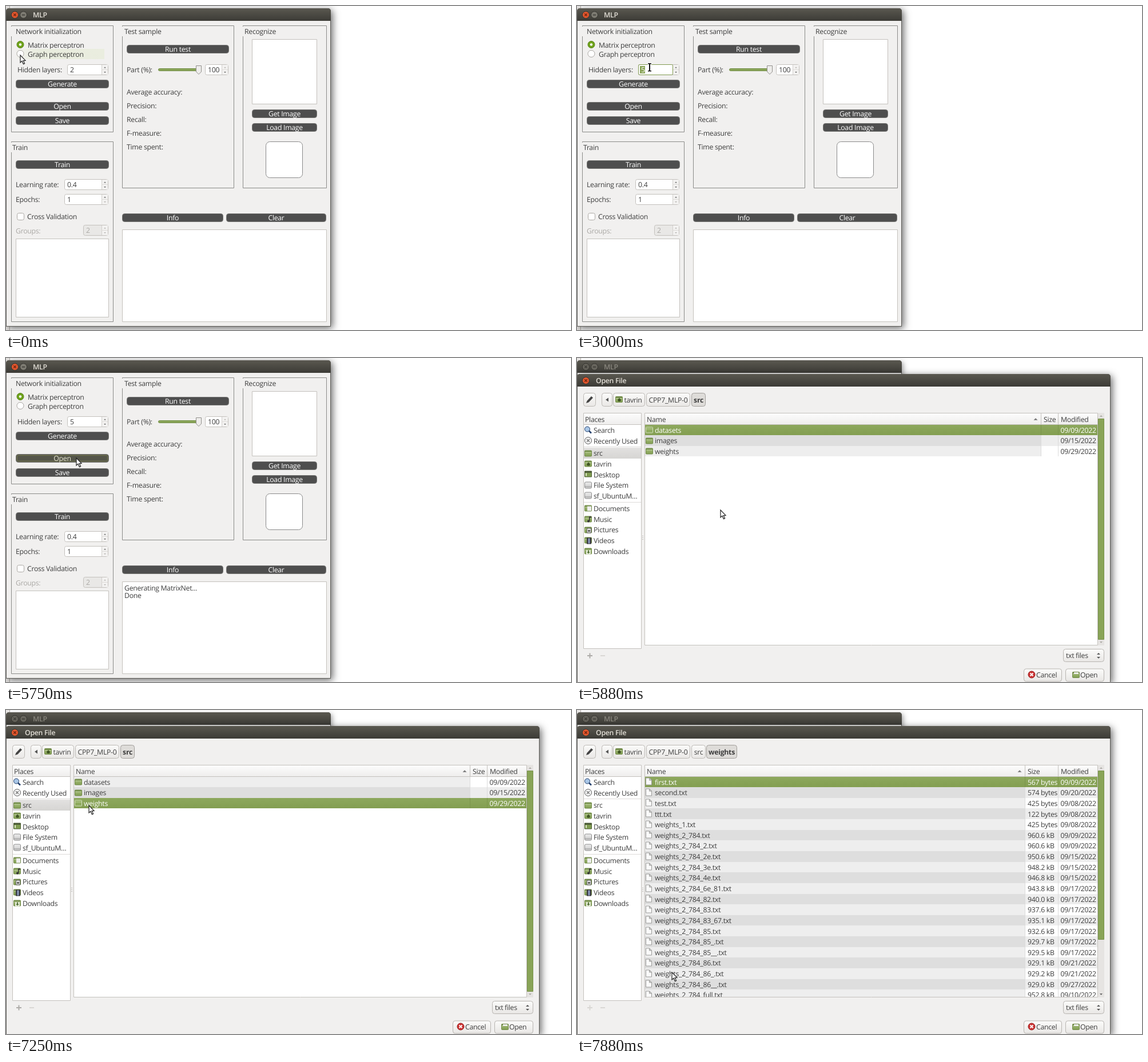
Write an HTML page with a canvas that moves like this. It is 988 px wide and 567 px high and loops after 8 s.

```html
<!DOCTYPE html>
<html lang="en">
<head>
<meta charset="utf-8">
<title>Perceptron window</title>
<style>
html, body { margin: 0; width: 100%; height: 100%; overflow: hidden; background: #fff; }
canvas { display: block; }
</style>
</head>
<body>
<canvas id="stage" width="988" height="567"></canvas>
<script>
const ctx = document.getElementById('stage').getContext('2d');
const LOOP = 8000, STEP = 125;
const FACE = '#f1f0ef', INK = '#3e3e3e', GREEN = '#89a458', LINE = '#8b8b89', PALE = '#c4c1bd';

// time, x, y of the pointer
const pointerPath = [
  [0, 25, 86], [125, 25, 84], [500, 29, 67], [1000, 32, 68], [1500, 162, 111],
  [1750, 171, 107], [2500, 171, 107], [2750, 160, 107], [3000, 127, 107],
  [3250, 119, 134], [4250, 119, 134], [4875, 123, 175], [5750, 123, 175],
  [5875, 251, 266], [6125, 246, 258], [6750, 145, 167], [7500, 145, 167],
  [7625, 148, 205], [7875, 166, 459]
];
const OPEN_AT = 5875, ENTER_AT = 7500;

function pointerAt(t) {
  const i = pointerPath.findIndex(p => p[0] > t);
  if (i < 0) return pointerPath.at(-1).slice(1);
  const [t0, x0, y0] = pointerPath[i - 1], [t1, x1, y1] = pointerPath[i];
  const k = (t - t0) / (t1 - t0);
  return [x0 + (x1 - x0) * k, y0 + (y1 - y0) * k];
}

function text(s, x, yc, color = INK, align = 'left', weight = 500) {
  ctx.font = weight + ' 12.3px "Open Sans", sans-serif';
  ctx.letterSpacing = '-0.3px';
  ctx.textRendering = 'geometricPrecision';
  ctx.textAlign = align;
  ctx.fillStyle = color;
  ctx.fillText(s, x, yc + 4.5);
}

function rect(x0, y0, x1, y1, fill) {
  ctx.fillStyle = fill;
  ctx.fillRect(x0, y0, x1 - x0, y1 - y0);
}

function box(x0, y0, x1, y1, fill, stroke, radius = 0) {
  ctx.beginPath();
  ctx.roundRect(x0 + .5, y0 + .5, x1 - x0 - 1, y1 - y0 - 1, radius);
  paint(fill, stroke);
}

function paint(fill, stroke, width = 1) {
  if (fill) { ctx.fillStyle = fill; ctx.fill(); }
  if (stroke) { ctx.strokeStyle = stroke; ctx.lineWidth = width; ctx.stroke(); }
}

function poly(points, fill, stroke, width) {
  ctx.beginPath();
  points.forEach(([x, y]) => ctx.lineTo(x, y));
  ctx.closePath();
  paint(fill, stroke, width);
}

function disc(x, y, r, fill, stroke) {
  ctx.beginPath();
  ctx.arc(x, y, r, 0, 7);
  paint(fill, stroke);
}

function cross(x, y, r, color, width = 1.3) {
  ctx.beginPath();
  ctx.moveTo(x - r, y - r); ctx.lineTo(x + r, y + r);
  ctx.moveTo(x + r, y - r); ctx.lineTo(x - r, y + r);
  paint(null, color, width);
}

function shade(y0, y1, top, bottom) {
  const g = ctx.createLinearGradient(0, y0, 0, y1);
  g.addColorStop(0, top);
  g.addColorStop(1, bottom);
  return g;
}

// small triangle; dir -1 points up, 1 points down
function tri(x, y, dir, r, color) {
  poly([[x - r, y - dir * r / 2], [x + r, y - dir * r / 2], [x, y + dir * r / 2]], color);
}

function windowFrame(y, right, bottom, title, titleX, active, minimize) {
  ctx.save();
  ctx.shadowColor = active ? 'rgba(0,0,0,.6)' : 'rgba(0,0,0,.35)';
  ctx.shadowBlur = active ? 13 : 8;
  ctx.shadowOffsetX = ctx.shadowOffsetY = 3;
  ctx.beginPath();
  ctx.roundRect(0, y, right, bottom - y, [5, 5, 0, 0]);
  paint('#5d5c57');
  ctx.restore();
  ctx.beginPath();
  ctx.roundRect(0, y, right, 22, [5, 5, 0, 0]);
  paint(shade(y, y + 22, '#5a5850', '#3c3b36'));
  rect(1, y + 22, right - 1, bottom - 1, FACE);
  const cy = y + 11.5;
  disc(15.5, cy, 6, active ? '#e4572e' : '#66645c', '#34332e');
  cross(15.5, cy, 2.3, active ? '#6b2410' : '#3a3934');
  if (minimize) {
    disc(30.5, cy, 6, active ? '#7b7970' : '#66645c', '#34332e');
    rect(28, cy - .5, 33, cy + .8, '#32312d');
  }
  text(title, titleX, cy - .3, active ? '#e2ded6' : '#8a877e', 'left', 600);
}

function group(x0, y0, x1, y1, title, tx) {
  box(x0, y0, x1, y1, null, LINE);
  rect(x0, y0 + 2, x0 + 2, y0 + 19, FACE);
  text(title, tx, y0 + 10);
}

function button(x0, x1, yc, label, focused) {
  const y = Math.round(yc - 7.5);
  box(x0, y, x1, y + 15, focused ? '#55564a' : '#4e4e4e', '#777775', 4);
  if (focused) box(x0 + 2, y + 2, x1 - 2, y + 13, null, '#74774f', 2);
  text(label, (x0 + x1) / 2, yc + .3, focused ? '#e9e8d4' : '#fff', 'center');
}

function spin(x0, x1, y0, value, { disabled, focused, atMax, atMin } = {}) {
  const y1 = y0 + 19, split = x1 - 12;
  box(x0, y0, x1, y1, disabled ? '#e9e8e6' : '#fff', PALE, 3);
  rect(split, y0 + 1, x1 - 1, y1 - 1, '#f3f2f1');
  rect(split, y0 + 1, split + 1, y1 - 1, '#d3d0cd');
  rect(split, y0 + 9, x1 - 1, y0 + 10, '#dddbd8');
  tri(x1 - 6, y0 + 5.5, -1, 2, disabled || atMax ? '#b5b3b0' : '#666');
  tri(x1 - 6, y0 + 14, 1, 2, disabled || atMin ? '#b5b3b0' : '#666');
  if (focused) {
    box(x0, y0, split + 1, y1, null, '#80994f', 2);
    rect(x0 + 3, y0 + 3, x0 + 12, y0 + 16, GREEN);
  }
  text(value, x0 + 5, y0 + 9.5, disabled ? '#aaa8a5' : focused ? '#fff' : INK);
}

function radio(yc, label, checked, hovered, focused) {
  if (hovered) {
    const g = ctx.createLinearGradient(18, 0, 172, 0);
    g.addColorStop(0, '#f0f0ec');
    g.addColorStop(.3, '#e8ecdd');
    g.addColorStop(1, '#eaeddf');
    rect(18, yc - 9, 172, yc + 9, g);
  }
  if (focused) box(36, yc - 7, 140, yc + 8, '#dfe7cf', '#9db374', 2);
  disc(25, yc - .5, 6, checked ? '#6fa31a' : '#fff', checked ? '#55801a' : '#a9a6a2');
  if (checked) disc(25, yc - .5, 2.2, '#fff');
  text(label, 38, yc);
}

function mainWindow(t, [px, py]) {
  windowFrame(4, 568, 561, 'MLP', 47, true, true);
  group(9, 34, 188, 221, 'Network initialization', 17);
  group(9, 237, 188, 553, 'Train', 11);
  group(203, 34, 399, 319, 'Test sample', 207);
  group(414, 34, 561, 319, 'Recognize', 417);

  const overRadio = y => px >= 18 && px < 173 && Math.abs(py - y) < 9;
  const clickedRadio = t >= 625 && t < 1875;
  radio(68, 'Matrix perceptron', true, overRadio(68), clickedRadio);
  radio(84, 'Graph perceptron', false, overRadio(84));
  const layers = 2 + (t >= 1875) + (t >= 2125) + (t >= 2375);
  text('Hidden layers:', 20, 111.5);
  spin(107, 179, 102, layers, { focused: t >= 1875 && t < 3500 });
  button(17, 180, 136, 'Generate', t >= 3500 && t < 5375);
  button(17, 180, 175.5, 'Open', t >= 5375);
  button(17, 180, 200, 'Save');

  button(17, 180, 277.5, 'Train');
  text('Learning rate:', 17, 312.5);
  spin(102, 179, 303, '0.4');
  text('Epochs:', 17, 338.5);
  spin(102, 179, 329, '1', { atMin: true });
  box(19, 362, 32, 375, '#fff', '#aaa7a3', 3);
  text('Cross Validation', 37, 368.5);
  text('Groups:', 17, 393, '#aaa8a5');
  spin(135, 179, 383, '2', { disabled: true });
  box(17, 407, 180, 545, '#fff', PALE);

  button(211, 390, 75, 'Run test');
  text('Part (%):', 211, 111.5);
  box(266, 109, 337, 114, GREEN, '#75904a', 2);
  poly([[332.5, 104.5], [341.5, 104.5], [341.5, 115], [337, 119.5], [332.5, 115]], '#eeedeb', '#918f8c');
  spin(348, 389, 102, '100', { atMax: true });
  ['Average accuracy:', 'Precision:', 'Recall:', 'F-measure:', 'Time spent:']
    .forEach((s, i) => text(s, 211, 150 + 24 * i));

  box(430, 58, 544, 172, '#fff', PALE);
  button(430, 544, 188, 'Get Image');
  button(430, 544, 212, 'Load Image');
  box(454, 237, 519, 301, '#fff', '#8a8a8a', 7);

  button(203, 380, 370.5, 'Info');
  button(385, 560, 370.5, 'Clear');
  box(203, 391, 561, 553, '#fff', PALE);
  if (t >= 3625) text('Generating MatrixNet...', 207, 402);
  if (t >= 3750) text('Done', 207, 415.5);
}

function folder(x, yc, mark) {
  box(x, yc - 5, x + 13, yc + 6, shade(yc - 3, yc + 6, '#a3bb78', '#7f9c50'), '#718a49', 1);
  rect(x + 1, yc - 4, x + 12, yc - 2, '#6f8a45');
  rect(x + 1, yc - 2, x + 12, yc - 1, '#c3d3a3');
  if (mark) mark(x + 7, yc + 1);
}

// folder in a selected row, only its pale outline shows
function openFolder(x, yc) {
  box(x, yc - 5, x + 13, yc + 6, '#8fab5f', '#d3dfbd', 1);
  rect(x + 1, yc - 2, x + 12, yc - 1, '#c3d3a3');
}

function page(x, yc) {
  poly([[x + .5, yc - 6.5], [x + 6.5, yc - 6.5], [x + 10.5, yc - 2.5], [x + 10.5, yc + 5.5], [x + .5, yc + 5.5]], '#fafafa', '#9a9a98');
  poly([[x + 6.5, yc - 6.5], [x + 6.5, yc - 2.5], [x + 10.5, yc - 2.5]], '#ddd', '#9a9a98');
}

function drive(x, yc) {
  box(x, yc - 6, x + 13, yc + 6, shade(yc - 6, yc + 6, '#eee', '#c8c8c8'), '#8c8c8c', 2);
  rect(x + 1, yc + 2, x + 12, yc + 3, '#999');
}

const house = (x, y) => poly([[x - 3, y], [x, y - 3], [x + 3, y], [x + 2, y + 3], [x - 2, y + 3]], '#3f5423');
const sheet = (x, y) => rect(x - 2, y - 4, x + 5, y + 4, '#eee');
const note = (x, y) => { disc(x, y + 3, 2, '#333'); rect(x + 1, y - 5, x + 2.5, y + 3, '#333'); rect(x + 2, y - 5, x + 5, y - 3, '#333'); };
const photo = (x, y) => { box(x - 3, y - 4, x + 5, y + 5, '#eee', '#555'); disc(x + 1, y + 1, 2, '#555'); };
const film = (x, y) => { rect(x - 3, y - 5, x + 5, y + 6, '#333'); rect(x - 1, y - 4, x + 3, y + 5, '#7d88a8'); };
const down = (x, y) => { rect(x - 4, y - 2, x + 4, y + 5, '#e8eedc'); rect(x - 1, y - 2, x + 1, y + 2, '#55713a'); tri(x, y + 2.5, 1, 3, '#55713a'); };

const places = [
  ['Search', 126, (x, y) => {
    disc(x + 5, y - 1, 4.5, '#a9c6e6', '#24406c');
    poly([[x + 8, y + 2], [x + 12, y + 6]], null, '#24406c', 2.5);
  }],
  ['Recently Used', 145, (x, y) => { disc(x + 6.5, y, 6, '#f4f4f4', '#555'); cross(x + 6.5, y, 2.5, '#777'); }],
  ['src', 166.5, folder],
  ['tavrin', 185, (x, y) => folder(x, y, house)],
  ['Desktop', 204, (x, y) => { box(x, y - 6, x + 13, y + 5, '#7f9c50', '#4b5c34'); rect(x + 1, y - 5, x + 12, y - 3, '#3f4a30'); rect(x + 2, y - 2, x + 4, y + 3, '#dce6c8'); }],
  ['File System', 222.5, drive],
  ['sf_UbuntuM…', 241, drive],
  ['Documents', 263, (x, y) => folder(x, y, sheet)],
  ['Music', 282, (x, y) => folder(x, y, note)],
  ['Pictures', 300.5, (x, y) => folder(x, y, photo)],
  ['Videos', 319, (x, y) => folder(x, y, film)],
  ['Downloads', 338, (x, y) => folder(x, y, down)]
];

const folders = [['datasets', '', '09/09'], ['images', '', '09/15'], ['weights', '', '09/29']];
const files = `first 567 09 09|second 574 09 20|test 425 09 08|ttt 122 09 08|weights_1 425 09 08
_ 960.6 09 09|_2 960.6 09 09|_2e 950.6 09 15|_3e 948.2 09 15|_4e 946.8 09 15|_6e_81 943.8 09 17
_82 940.0 09 17|_83 937.6 09 17|_83_67 935.1 09 17|_85 932.6 09 17|_85_ 929.7 09 17|_85__ 929.5 09 17
_86 929.1 09 21|_86_ 929.2 09 21|_86__ 929.0 09 27|_full 952.8 09 10`.split(/[|\n]/).map(line => {
  const [name, size, month, day] = line.split(' ');
  const base = name[0] === '_' ? 'weights_2_784' + (name === '_' ? '' : name) : name;
  return [base + '.txt', size + (size.includes('.') ? ' kB' : ' bytes'), month + '/' + day];
});

function pathButton(x0, x1, label, pressed, labelX = (x0 + x1) / 2) {
  box(x0, 61, x1, 85, pressed ? '#dedcd9' : shade(61, 85, '#fbfbfa', '#e9e7e5'), pressed ? '#a19e9a' : '#bcb9b5', 4);
  text(label, labelX, 73, INK, 'center', pressed ? 700 : 500);
}

function actionButton(x0, x1, y0, label, labelX) {
  box(x0, y0, x1, y0 + 23, shade(y0, y0 + 23, '#fcfcfb', '#e8e6e4'), '#b8b5b1', 4);
  text(label, labelX, y0 + 11);
}

function fileList(rows, selected, sizeX, thumbEnd, icon, selectedIcon = icon) {
  const top = 116.6, rowH = 18.63;
  box(118, 96, 911, 503, '#fff', PALE);
  ctx.save();
  ctx.beginPath();
  ctx.rect(119, 97, 791, 405);
  ctx.clip();
  rows.forEach(([name, size, date], i) => {
    const y = Math.round(top + i * rowH), end = Math.round(top + (i + 1) * rowH), yc = 126.2 + i * rowH;
    const chosen = i === selected, ink = chosen ? '#fff' : INK;
    rect(119, y, 910, end, i % 2 ? '#ededed' : '#fff');
    rect(119, y, sizeX, end, i % 2 ? '#dedede' : '#eeeeee');
    if (chosen) rect(119, y, 910, end, shade(y, end, '#8da85d', '#839e51'));
    rect(sizeX - 1, y, sizeX, end, chosen ? '#7b954c' : '#dcdcdc');
    rect(841, y, 842, end, chosen ? '#7b954c' : '#dcdcdc');
    (chosen ? selectedIcon : icon)(120, Math.round(yc) - .5);
    text(name, 136, yc, ink);
    text(size, 788, yc, ink);
    text(date + '/2022', 845.5, yc, ink);
  });
  rect(119, 97, 910, 116, shade(97, 116, '#fcfcfc', '#efeeed'));
  rect(119, 116, 910, 117, PALE);
  rect(sizeX - 1, 97, sizeX, 116, PALE);
  rect(841, 97, 842, 116, PALE);
  ctx.restore();
  text('Name', 122, 107);
  text('Size', sizeX + 4, 107);
  text('Modified', 846, 107);
  tri(sizeX - 10, 107, -1, 3.5, '#777');

  rect(911, 96, 922, 503, '#e6e4e2');
  box(911, 106, 922, thumbEnd, GREEN, '#78934a');
  tri(916.5, 101.5, -1, 2.5, '#a5a29e');
  tri(916.5, 497.5, 1, 2.5, thumbEnd < 450 ? '#555' : '#a5a29e');
}

function dialog(t) {
  const inside = t >= ENTER_AT;
  windowFrame(4, 568, 567, 'MLP', 47, false, true);
  windowFrame(28, 933, 568, 'Open File', 33, true, false);

  pathButton(11, 33, '');
  poly([[16, 79], [17.5, 75], [25, 67], [28, 69.5], [20.5, 77.5]], '#444');
  pathButton(43, 62, '');
  poly([[50, 73], [55, 69.5], [55, 76.5]], '#555');
  pathButton(63, 119, 'tavrin', false, 98);
  folder(67, 72, house);
  pathButton(121, 198, 'CPP7_MLP-0');
  pathButton(200, 225, 'src', !inside);
  if (inside) pathButton(226, 280, 'weights', true);

  box(11, 96, 113, 509, '#fff', PALE);
  rect(12, 97, 112, 116, shade(97, 116, '#fcfcfc', '#efeeed'));
  rect(12, 116, 112, 117, PALE);
  text('Places', 14, 107);
  if (!inside) rect(12, 157, 112, 176, shade(157, 176, '#e2e1e0', '#d6d5d3'));
  rect(12, 155, 112, 156, '#dddbd9');
  rect(12, 252, 112, 253, '#dddbd9');
  for (const [name, y, icon] of places) {
    icon(13, Math.round(y) - .5);
    text(name, 29, y);
  }
  for (let y = 311; y < 319; y += 3) rect(114, y, 116, y + 1, '#bbb8b4');

  if (inside) fileList(files, 0, 784, 402, page);
  else fileList(folders, t < 6875 ? 0 : 2, 812, 493, folder, openFolder);

  const plus = inside ? '#d9d7d4' : '#aeaca9';
  rect(18, 520, 27, 522, plus);
  rect(21.5, 516.5, 23.5, 525.5, plus);
  rect(41, 520, 49, 522, '#d9d7d4');
  actionButton(850, 922, 509, 'txt files', 855);
  tri(912, 517.5, -1, 3, '#555');
  tri(912, 524.5, 1, 3, '#555');
  actionButton(781, 848, 543.5, 'Cancel', 803);
  disc(795, 554, 6, '#cc3232', '#962020');
  cross(795, 554, 2.5, '#fff', 2);
  actionButton(854, 922, 543.5, 'Open', 880);
  folder(866, 554, (x, y) => rect(x - 4, y - 5, x + 4, y - 2, '#eee'));
}

function pointer([x, y], beam) {
  if (beam) {
    for (const [grow, color] of [[1, '#fff'], [0, '#111']]) {
      rect(x - 1 - grow, y - 7 - grow, x + 1 + grow, y + 7 + grow, color);
      for (const dy of [-7, 6]) rect(x - 3 - grow, y + dy - grow, x + 3 + grow, y + dy + 1.5 + grow, color);
    }
    return;
  }
  const shape = [[0, 0], [0, 13], [3, 10.3], [5.4, 15.6], [7.6, 14.6], [5.2, 9.6], [9, 9.4]];
  poly(shape.map(([dx, dy]) => [x + dx, y + dy]), '#fff', '#222', 1.2);
}

function draw(now) {
  const t = Math.floor(now % LOOP / STEP) * STEP;
  const at = pointerAt(t);
  rect(0, 0, 988, 567, '#fff');
  rect(0, 0, 6, 567, '#eceae8');
  rect(6, 0, 7, 567, '#b5b2ae');
  if (t < OPEN_AT) mainWindow(t, at);
  else dialog(t);
  const [x, y] = at;
  pointer(at, t < OPEN_AT && x > 107 && x < 166 && y > 102 && y < 121);
  requestAnimationFrame(() => draw(performance.now() - start));
}

const start = performance.now();
draw(0);
</script>
</body>
</html>
```
